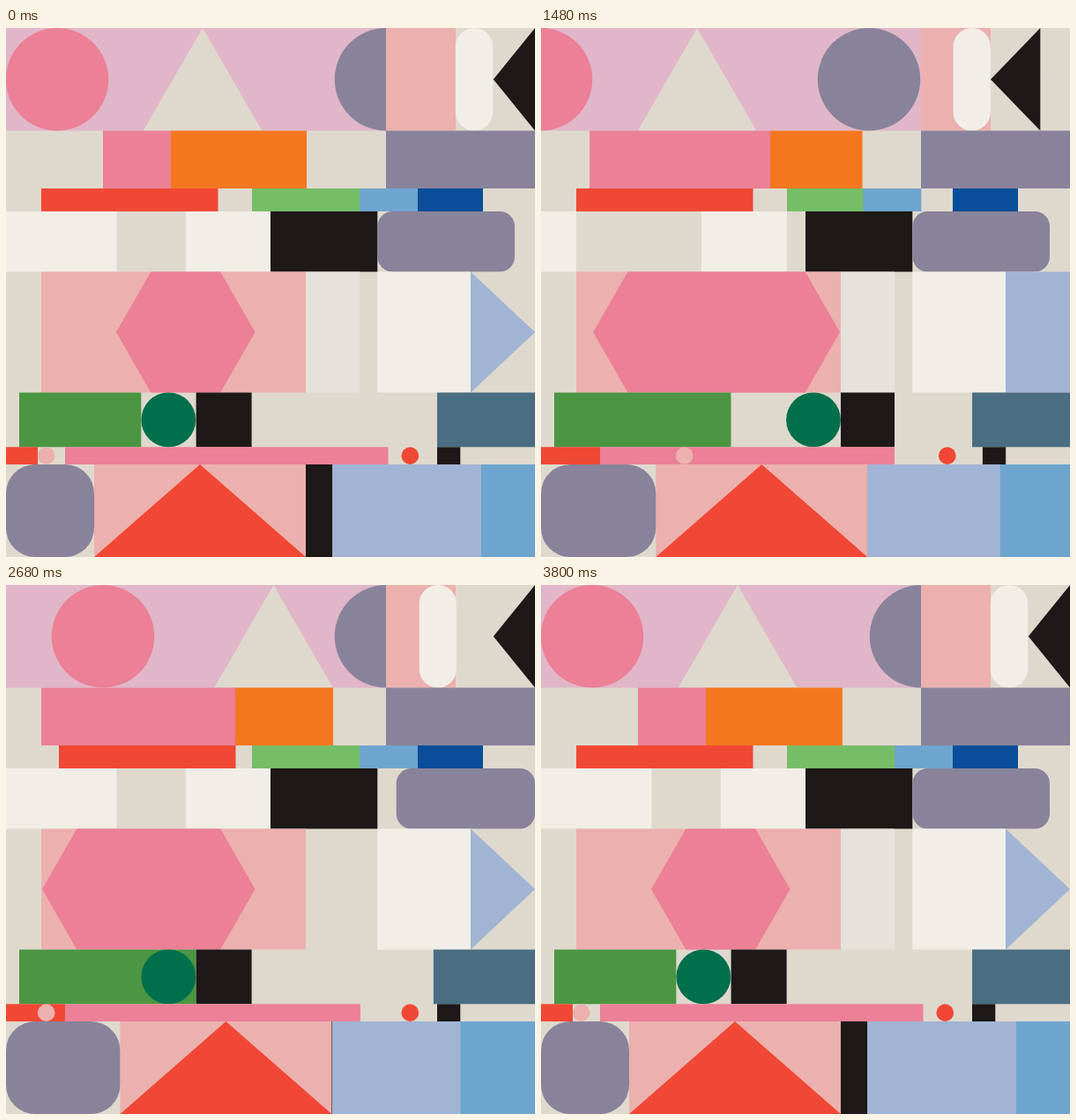
An HTML page for the animation above (3.84 s loop, 600 by 600 pixels).

```html
<!DOCTYPE html>
<html lang="en">
<head>
<meta charset="utf-8">
<title>Sliding shapes</title>
<style>
  html, body { margin: 0; width: 100%; height: 100%; overflow: hidden; background: #dfd9cd; }
  svg { display: block; width: 100vw; height: 100vh; }
</style>
</head>
<body>
<svg id="stage" viewBox="0 0 600 600"></svg>
<script>
const LOOP = 3840, UNIT = 80, MOVE = 5;
const C = {
  bg: '#dfd9cd', lilac: '#e0b6c8', pink: '#eb8097', salmon: '#ecb0ae', purple: '#88839a',
  white: '#f0eee7', pale: '#e5e2db', black: '#1d1918', orange: '#f47720', red: '#f04834',
  lime: '#76bd67', sky: '#6ea5cf', navy: '#0a4d9a', mist: '#a1b4d4', green: '#4b9543',
  forest: '#006f4c', teal: '#4a6d82'
};
const Y = [0, 116.5, 182, 208, 276.5, 413.5, 475.3, 495, 600];
const stage = document.getElementById('stage');
const parts = [];

// A value that eases to each [start, target] in turn; starts are in units.
const track = (from, ...moves) => u => {
  let v = from;
  for (const [start, to] of moves) {
    const p = Math.min(1, Math.max(0, (u - start) / MOVE));
    v += (to - v) * p * p * (3 - 2 * p);
  }
  return v;
};
const at = (v, u) => typeof v === 'function' ? v(u) : v;
const plus = (v, d) => u => at(v, u) + d;

function add(tag, fill, attrs) {
  const el = document.createElementNS('http://www.w3.org/2000/svg', tag);
  el.setAttribute('fill', fill);
  stage.appendChild(el);
  parts.push(u => {
    const now = attrs(u);
    for (const k in now) el.setAttribute(k, now[k]);
  });
}
function bar(row, left, right, fill, rx = 0) {
  add('rect', fill, u => {
    const x = at(left, u);
    return { x, y: Y[row], width: Math.max(0, at(right, u) - x), height: Y[row + 1] - Y[row], rx };
  });
}
function block(row, left, width, fill, rx) {
  bar(row, left, plus(left, width), fill, rx);
}
function disc(row, cx, fill, scale = 1) {
  const r = (Y[row + 1] - Y[row]) / 2;
  add('circle', fill, u => ({ cx: at(cx, u), cy: Y[row] + r, r: r * at(scale, u) }));
}
function poly(fill, points) {
  add('polygon', fill, u => ({ points: points(u).join(' ') }));
}
function peak(row, x, half, fill) {
  poly(fill, u => {
    const c = at(x, u);
    return [[c - half, Y[row + 1]], [c, Y[row]], [c + half, Y[row + 1]]];
  });
}

// Row 0
block(0, 0, 431, C.lilac);
disc(0, track(58, [6, 0], [27, 110], [34, 58]), C.pink);
peak(0, track(223, [7, 177], [26, 303.5], [35, 223]), 67.3, C.bg);
disc(0, track(431, [0, 372], [20, 431]), C.purple);
bar(0, 431, 510, C.salmon);
bar(0, 510, 600, C.bg);
block(0, track(509.8, [0, 467.5], [33, 509.8]), 42.4, C.white, 21.2);
const tip = track(552.8, [11, 510], [27, 552.8]);
const back = track(600, [15, 557], [27, 600]);
poly(C.black, u => [[tip(u), 58.2], [back(u), 0], [back(u), Y[1]]]);

// Row 1
const seam = track(187, [0, 260], [42, 187]);
bar(1, track(110, [15, 40], [35, 110]), seam, C.pink);
bar(1, seam, track(341, [15, 371], [43, 341]), C.orange);
bar(1, track(431, [35, 466], [42, 431]), 600, C.purple);

// Row 2
block(2, track(40, [26, 60], [42, 40]), 200.5, C.red);
block(2, track(279, [0, 240], [10, 279]), 122, C.lime);
block(2, track(401, [15, 355.5], [26, 401]), 66, C.sky);
block(2, track(467, [35, 485.5], [42, 467]), 74, C.navy);

// Row 3
bar(3, 0, track(125.5, [0, 40], [20, 125.5]), C.white);
block(3, track(203.8, [6, 182], [27, 203.8]), 96.8, C.white);
block(3, track(300, [20, 279], [27, 300]), 121.3, C.black);
bar(3, track(421.4, [27, 442.7], [35, 421.4]), track(577, [20, 600], [42, 577]), C.purple, 17);

// Row 4
bar(4, 340, track(401, [25, 340], [42, 401]), C.pale);
bar(4, track(40, [0, 0], [7, 40]), 340, C.salmon);
const hexL = track(125, [15, 41], [42, 125]);
const hexR = track(282.5, [6, 339], [26, 282.5]);
poly(C.pink, u => {
  const l = hexL(u), r = hexR(u), cut = 39.3;
  return [[l, 345], [l + cut, Y[4]], [r - cut, Y[4]], [r, 345], [r - cut, Y[5]], [l + cut, Y[5]]];
});
bar(4, 421.4, 527, C.white);
const open = track(0, [11, 68.5], [27, 0]);
poly(C.mist, u => [[527, Y[4]], [600, 345 - open(u)], [600, 345 + open(u)], [527, Y[5]]]);

// Row 5
bar(5, 15, track(153.3, [0, 215.5], [34, 153.3]), C.green);
disc(5, track(184.3, [0, 309], [27, 184.3]), C.forest);
bar(5, track(215.6, [7, 340], [25, 215.6]), track(278.6, [6, 401], [26, 278.6]), C.black);
bar(5, track(489, [33, 340], [42, 489]), 600, C.teal);

// Row 6
bar(6, 0, track(36, [0, 67], [34, 36]), C.red);
bar(6, 67, track(433.5, [11, 401], [33, 433.5]), C.pink);
disc(6, track(45.7, [2, 162.7], [26, 45.7]), C.salmon, track(1, [0, 0], [7, 1]));
disc(6, track(458.3, [11, 463.3], [16, 458.3]), C.red);
block(6, track(489, [7, 512.7], [16, 489]), 26.3, C.black);

// Row 7
const push = track(100, [6, 130.3], [33, 100]);
bar(7, 340, 370.3, C.black);
block(7, push, 240, C.salmon);
peak(7, plus(push, 120), 120, C.red);
bar(7, 0, push, C.purple, 33);
const split = track(539, [15, 515.3], [42, 539]);
bar(7, 370.3, split, C.mist);
bar(7, split, 600, C.sky);

function draw(ms) {
  const u = (ms % LOOP) / UNIT;
  for (const part of parts) part(u);
}
let began;
function tick(now) {
  if (began === undefined) began = now;
  draw(Math.max(0, now - began));
  requestAnimationFrame(tick);
}
draw(0);
requestAnimationFrame(tick);
</script>
</body>
</html>
```
